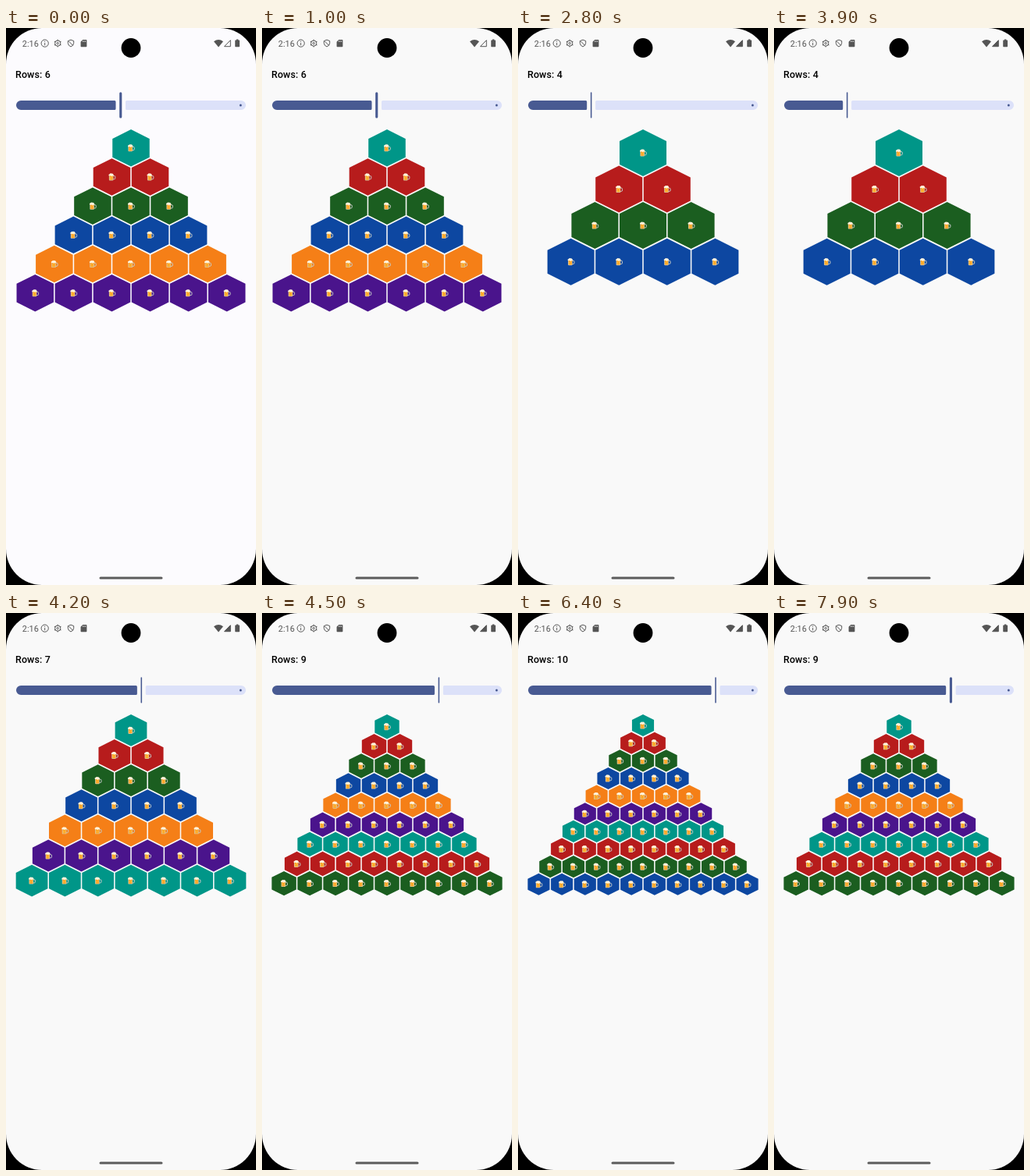
An HTML page that plays this animation: 320x714 px, repeating every 8 s.

```html
<!DOCTYPE html>
<html lang="en">
<head>
<meta charset="utf-8">
<title>Hexagon pyramid</title>
<style>
  html, body { margin: 0; width: 100%; height: 100%; overflow: hidden; background: #000; }
  svg { display: block; width: 100%; height: 100%; }
  text { font-family: Roboto, sans-serif; }
  #label { font-size: 12.46px; font-weight: 500; letter-spacing: .12px; }
  #clock { font-size: 10.9px; fill: #555; }
  .line { fill: none; stroke: #555; stroke-width: 1; }
  .solid { fill: #555; }
  .accent { fill: #485a92; }
</style>
</head>
<body>
<svg viewBox="0 0 320 714">
  <defs>
    <g id="mug">
      <path d="M1.6-1.4H3.2Q4.3-1.4 4.3-.2V1.6Q4.3 2.8 3.2 2.8H1.6" fill="none" stroke="#c5cbc9" stroke-width="1"/>
      <path d="M-3.6-2.4H2V3.6Q2 4.5 1 4.5H-2.6Q-3.6 4.5-3.6 3.6Z" fill="#d9c7a4"/>
      <path d="M-2.8-2H1.3V3.7H-2.8Z" fill="#ffa11a"/>
      <path d="M-1.9 0V3M.3 0V3" stroke="#ffc65a" stroke-width=".7"/>
      <path d="M-3.9-1.6Q-4.7-3.5-2.9-3.8-2-5-.6-4.4 1.2-4.8 1.8-3.5 2.9-2.7 2.1-1.4L.6-1.5-.2-.5-1.2-1.4Z" fill="#fff3dc"/>
    </g>
  </defs>

  <rect width="320" height="714"/>
  <rect id="screen" width="320" height="714" rx="46"/>
  <circle cx="160" cy="25.5" r="12.4"/>
  <rect x="119.5" y="703.4" width="81" height="3.2" rx="1.6" fill="#5c5c5c"/>

  <text id="clock" x="20.8" y="23.5">2:16</text>
  <circle class="line" cx="49.7" cy="19.6" r="4.6"/>
  <path class="line" d="M49.7 19V22.2M49.7 16.8V17.9"/>
  <g id="gear" transform="translate(66.2 19.6)">
    <circle class="line" r="3.6"/>
    <circle class="line" r="1.2"/>
  </g>
  <path class="line" d="M83 15.2L86.7 16.6V19.4Q86.5 22.6 83 24 79.5 22.6 79.3 19.4V16.6ZM80.5 17.2L85.6 22.3"/>
  <path class="solid" d="M98.3 15H102.6Q103.4 15 103.4 15.8V23.4Q103.4 24.2 102.6 24.2H96.4Q95.6 24.2 95.6 23.4V17.7Z"/>
  <path d="M98.4 16.3V18M100 16.3V18M101.6 16.3V18" stroke="#f9f9f9" stroke-width=".7"/>
  <path class="solid" d="M266 17.2Q272 12.6 278 17.2L272 24.4Z"/>
  <path id="signal" class="line" d="M287.3 15.7V23.7H279.5Z"/>
  <path class="solid" d="M294.9 14.6H297.3V15.6H298.3Q299 15.6 299 16.3V23.6Q299 24.3 298.3 24.3H293.9Q293.2 24.3 293.2 23.6V16.3Q293.2 15.6 293.9 15.6H294.9Z"/>

  <text id="label" x="12" y="64"></text>
  <path id="active" class="accent"/>
  <path id="inactive" fill="#dce1f9"/>
  <circle class="accent" cx="300.3" cy="99" r="1.5"/>
  <rect id="thumb" class="accent" y="82.2" height="33.4"/>
  <g id="pyramid"></g>
</svg>
<script>
const LOOP = 8000;
const COLORS = ['#009688', '#b71c1c', '#1b5e20', '#0d47a1', '#f57f17', '#4a148c'];
// [start ms, rows]
const STEPS = [
  [0, 6], [2200, 5], [2500, 4], [3000, 3], [3200, 2], [3500, 3], [3800, 4],
  [4000, 5], [4100, 6], [4200, 7], [4300, 8], [4400, 9], [4800, 10], [5400, 11],
  [6200, 10], [6500, 9]
];
const PRESS = [1900, 6900];
const SIGNAL_ON = 1900;
const GAP = 1.56, WIDTH = 295.1, HEIGHT = 233.5, MAX_HEX = 60, TOP = 130;

const el = id => document.getElementById(id);
const set = (id, attrs) => {
  for (const name in attrs) el(id).setAttribute(name, attrs[name]);
};

for (let a = 0; a < 360; a += 60) {
  el('gear').insertAdjacentHTML('beforeend',
    `<path class="line" stroke-width="2" d="M0-3.3V-4.9" transform="rotate(${a})"/>`);
}

function hexSize(rows) {
  const gaps = GAP * (rows - 1);
  return Math.min(MAX_HEX, (WIDTH - gaps) / rows, (HEIGHT - gaps) / (1 + .75 * (rows - 1)));
}

function pyramid(rows) {
  const size = hexSize(rows), h = size / 2, q = size / 4;
  const hex = `M0 ${-h}L${h} ${-q}V${q}L0 ${h}L${-h} ${q}V${-q}Z`;
  let out = '';
  for (let r = 0; r < rows; r++) {
    const y = TOP + h + r * (.75 * size + GAP);
    for (let c = 0; c <= r; c++) {
      const x = 160 + (c - r / 2) * (size + GAP);
      out += `<g transform="translate(${x} ${y})"><path d="${hex}" fill="${COLORS[r % 6]}"/><use href="#mug"/></g>`;
    }
  }
  return out;
}

// Track piece with separate corner radii on its left and right ends
function track(x0, x1, left, right) {
  const y0 = 92.9, y1 = 105.1;
  return `M${x0 + left} ${y0}H${x1 - right}a${right} ${right} 0 0 1 ${right} ${right}` +
    `V${y1 - right}a${right} ${right} 0 0 1 ${-right} ${right}H${x0 + left}` +
    `a${left} ${left} 0 0 1 ${-left} ${-left}V${y0 + left}a${left} ${left} 0 0 1 ${left} ${-left}Z`;
}

function drawSlider(rows, pressed) {
  const x = 14 + 26.55 * (rows - 1);
  const half = pressed ? .78 : 1.56;
  set('thumb', { x: x - half, width: 2 * half, rx: half });
  set('active', { d: track(13, x - half - 4.67, 6.1, 1.5) });
  set('inactive', { d: track(x + half + 4.67, 307, 1.5, 6.1) });
}

let shownRows, shownState;
function render(t) {
  const rows = STEPS.filter(s => s[0] <= t).pop()[1];
  const pressed = t >= PRESS[0] && t < PRESS[1];
  const state = rows + '/' + pressed;
  if (rows !== shownRows) {
    el('label').textContent = 'Rows: ' + rows;
    el('pyramid').innerHTML = pyramid(rows);
    shownRows = rows;
  }
  if (state !== shownState) {
    drawSlider(rows, pressed);
    shownState = state;
  }
  const tint = Math.max(0, 1 - t / 500);
  set('screen', { fill: `rgb(${249 + 3 * tint},${249 + 2 * tint},${249 + 5 * tint})` });
  el('signal').style.fill = t < SIGNAL_ON ? 'none' : '#555';
}

const start = performance.now();
function frame() {
  render((performance.now() - start) % LOOP);
  requestAnimationFrame(frame);
}
frame();
</script>
</body>
</html>
```
